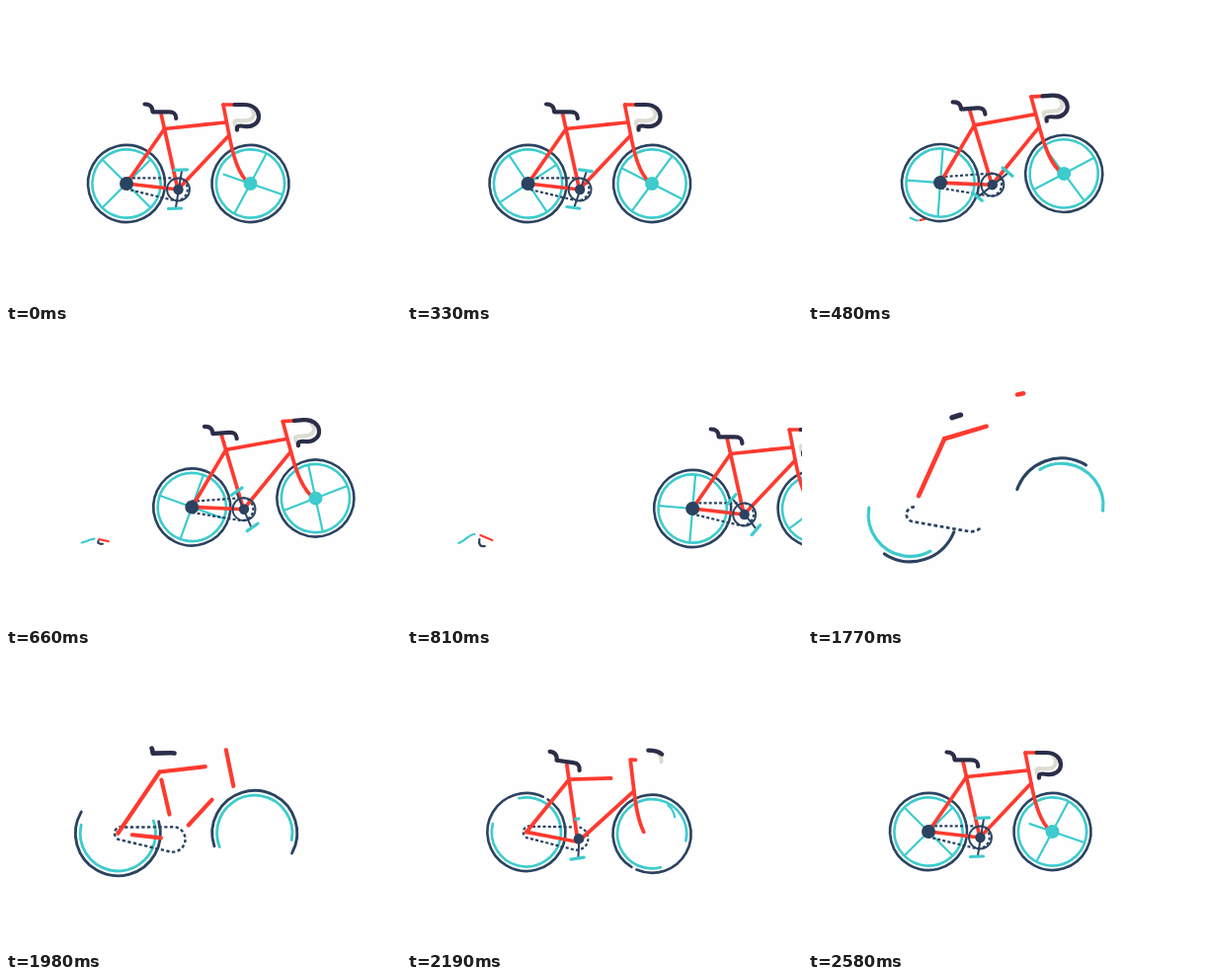
An HTML page that plays this animation: 400 px wide and 300 px high, repeating every 2.61 s.

```html
<!DOCTYPE html>
<html lang="en">
<head>
<meta charset="utf-8">
<title>Bicycle</title>
<style>
html, body { margin: 0; width: 100%; height: 100%; overflow: hidden; background: #fefefe; }
svg { display: block; width: 100vw; height: 100vh; }
path { fill: none; stroke-linecap: round; stroke-linejoin: round; }
#debris path { vector-effect: non-scaling-stroke; }
</style>
</head>
<body>
<svg viewBox="0 0 400 300">
  <g id="debris"></g>
  <g id="bike">
    <g id="wheels"></g>
    <g id="back"></g>
    <g id="frame"></g>
    <g id="front"></g>
  </g>
</svg>
<script>
const LOOP = 2610, RIDE_END = 1110, BUILD = 1500;
const RED = '#ff3a2f', TEAL = '#3dcbcd', NAVY = '#2b4360', INK = '#2b2d49', GREY = '#dcdcd2';
const REAR = [122, 180], FRONT = [247.5, 180], CRANK = [174.5, 186];
const [debris, bike, wheels, back, frame, front] =
  ['debris', 'bike', 'wheels', 'back', 'frame', 'front'].map(id => document.getElementById(id));

const { PI, sin, cos, min, max } = Math;
const ramp = (t, t0, t1) => min(1, max(0, (t - t0) / (t1 - t0)));
const polar = ([x, y], r, deg) => [x + r * cos(deg * PI / 180), y + r * sin(deg * PI / 180)];
const place = (el, value = '') => el.setAttribute('transform', value);

function add(parent, tag, attrs = {}) {
  const el = document.createElementNS('http://www.w3.org/2000/svg', tag);
  for (const k in attrs) el.setAttribute(k, attrs[k]);
  return parent.appendChild(el);
}
const stroke = (parent, d, color, width) =>
  add(parent, 'path', { d, stroke: color, 'stroke-width': width });

// Strokes that draw themselves from the point mid (0 to 1) outwards;
// with out set, they are wiped away again from that time on.
const lines = [];
function line(parent, d, color, width, t0, t1, mid = 0, out = Infinity) {
  const el = stroke(parent, d, color, width);
  el.setAttribute('pathLength', 1);
  lines.push({ el, t0, t1, mid, out });
}
function drawLine({ el, t0, t1, mid, out }, t) {
  const e = ramp(t, t0, t1);
  const a = max(mid * (1 - e), ramp(t, out, out + t1 - t0) || 0);
  const len = mid + (1 - mid) * e - a;
  el.style.display = len < 0.002 ? 'none' : '';
  el.setAttribute('stroke-dasharray', `${len} 2`);
  el.setAttribute('stroke-dashoffset', -a);
}

const dots = [];
function dot([cx, cy], r, color, t0, t1) {
  dots.push({ el: add(front, 'circle', { cx, cy, fill: color }), r, t0, t1 });
}

function ring(parent, hub, r, deg, ...style) {
  const a = polar(hub, r, deg), b = polar(hub, r, deg + 180);
  line(parent, `M${a}A${r} ${r} 0 0 1 ${b}A${r} ${r} 0 0 1 ${a}`, ...style);
}

// Wheels: two crossing bars make the four spokes
function wheel(hub, turn, bars) {
  ring(wheels, hub, 39, turn - 60, NAVY, 2.6, 1600, 2205, 0.33);
  ring(wheels, hub, 34.6, turn - 167, TEAL, 2.6, 1450, 2350, 1);
  const g = add(wheels, 'g');
  for (const deg of bars)
    for (const side of [0, 180]) {
      const late = deg === 19 && side ? 150 : 0;
      line(g, `M${hub}L${polar(hub, 34, deg + side)}`, TEAL, 2.2, 2260 + late, 2500 + late);
    }
  return g;
}
const rearSpokes = wheel(REAR, 0, [45, 135]);
const frontSpokes = wheel(FRONT, 178, [19, 118]);
line(wheels, 'M263 151Q269 156 270 163', TEAL, 2.2, 2100, 2190, 0, 2190);

const chain = stroke(back,
  'M126 174A6 6 0 0 0 124 186L170 197A11.5 11.5 0 1 0 174.5 174.3H126', NAVY, 2.2);
chain.style.strokeLinecap = 'butt';
const chainLen = chain.getTotalLength();
function drawChain(t, shift) {
  const part = ramp(t, 1560, 1965);
  const links = Math.floor(part * chainLen / 5.2);
  chain.style.display = links ? '' : 'none';
  chain.setAttribute('stroke-dasharray', part < 1 ? '3 2.2 '.repeat(links) + '0 400' : '3 2.2');
  chain.setAttribute('stroke-dashoffset', shift);
}

// Frame
const tube = (d, ...timing) => line(frame, d, RED, 3.7, ...timing);
tube('M157 109L174 186', 1830, 2200, 0.5);
tube('M122 180L174 186', 1830, 2130, 0.5);
tube('M174 186L226 131', 1860, 2150, 0.4);
tube('M160.5 124.5L122 180', 1500, 1860);
tube('M160.5 124.5L202 120.1', 1500, 1820);
tube('M202 120.1L222 118', 2190, 2340);
tube('M220 100L226 131C230 152 235 170 246 180', 1800, 2260, 0.1);
tube('M220 100H233', 2050, 2400);
tube('M225 100H230', 1700, 1760, 0.5, 1900);

const saddle = add(frame, 'g'), bars = add(frame, 'g');
line(saddle, 'M140.5 99.5C145 99.5 147 101 148 104L148.5 107.3H165C170 107.3 172 109 172.3 114',
  INK, 4.2, 1680, 2190, 0.5);
line(bars, 'M248 103C254 110 250 116 243 116C238 117 234 115 231.5 117L232 121',
  GREY, 4, 2100, 2490);
line(bars, 'M231.5 100H241C251 100 256 106 256 112C256 119 249 123 242 122C237 121 233 121 234 125.5',
  INK, 4.2, 2100, 2490, 0.12);

// Hubs and crank
dot(REAR, 7, NAVY, 2230, 2400);
dot(FRONT, 7, TEAL, 2230, 2400);
ring(front, CRANK, 11.5, -90, NAVY, 1.9, 2240, 2480);
const crank = add(front, 'g');
line(crank, 'M172 204L178 167', NAVY, 2, 2000, 2400);
line(crank, 'M164.5 205.5L177.5 205', TEAL, 3.2, 2000, 2160, 0.5);
line(crank, 'M170.5 166.3L183.5 165.8', TEAL, 3.2, 2130, 2400, 0.3);
dot(CRANK, 5.2, NAVY, 2000, 2150);

// Scraps thrown back by the rear wheel
stroke(debris, 'M-18.5 4C-12 2 -8 -5 -2.5 -5', TEAL, 2.2);
stroke(debris, 'M3.5 -4L15.5 1', RED, 2.2);
const hook = stroke(debris, 'M2.5 0C1.5 5 3 8 8 7', NAVY, 2.2);
function drawDebris(t) {
  const k = ramp(t, 400, 810), fade = 1 - ramp(t, RIDE_END, 1260);
  debris.style.display = k * fade ? '' : 'none';
  hook.style.display = t > 580 ? '' : 'none';
  const x = 112 - 41 * (max(0, t - 480) / 330) ** 1.15;
  place(debris, `translate(${x} ${217 - 5 * k}) scale(${k ** 0.5 * fade} ${(1.6 * k - 0.6) * fade})`);
}

// Wheelspin, a short wheelie, then off to the right
function ride(t) {
  const tilt = -6.2 * sin(PI * ramp(t, 340, 800)) ** 2;
  const x = 166.3 * (max(0, t - 246) / 564) ** 3;
  place(bike, `translate(${x} ${ramp(t, 340, 800) + 0.3 * tilt}) rotate(${tilt} ${REAR})`);
  [frame, saddle, bars].forEach(el => place(el));
  return 46 * (max(0, t - 110) / 370) ** 3;
}

// The parts shrink into place and swing out like a damped spring
function settle(t) {
  const grow = 0.15 * (1 + cos(PI * ramp(t, BUILD, 2300)));
  const v = ramp(t, BUILD, 2430) ** 1.73;
  const spring = (1 - v) * cos(1.5 * PI * v);
  const swing = -9.2 * spring, tilt = -5.4 * spring * (1 - v);
  place(bike, `translate(206 ${180 + 7 * v * (1 - v)}) rotate(${tilt}) scale(${1 + grow}) translate(-206 -180)`);
  place(frame, `translate(${REAR}) rotate(${swing}) scale(${1 + 0.1 * grow}) translate(-122 -180)`);
  place(saddle, `translate(${55 * grow - 0.7 * swing} 0) rotate(${swing} 165 107)`);
  place(bars, `translate(0 ${-3 * max(0, swing)})`);
  return -2 * max(0, swing);
}

function render(t) {
  const riding = t < RIDE_END;
  const built = riding ? t + LOOP : t;
  lines.forEach(l => drawLine(l, built));
  dots.forEach(({ el, r, t0, t1 }) => el.setAttribute('r', r * ramp(built, t0, t1)));

  const turn = riding ? ride(t) : settle(t);
  const spin = riding ? turn : 0, slip = min(1, spin / 46);
  place(rearSpokes, `rotate(${spin + 7 * slip} ${REAR})`);
  place(frontSpokes, `rotate(${spin - 8 * slip} ${FRONT})`);
  place(crank, `rotate(${turn} ${CRANK})`);
  drawChain(built, spin * 0.2);
  drawDebris(t);
}

const start = performance.now();
function tick() {
  render((performance.now() - start) % LOOP);
  requestAnimationFrame(tick);
}
tick();
</script>
</body>
</html>
```
